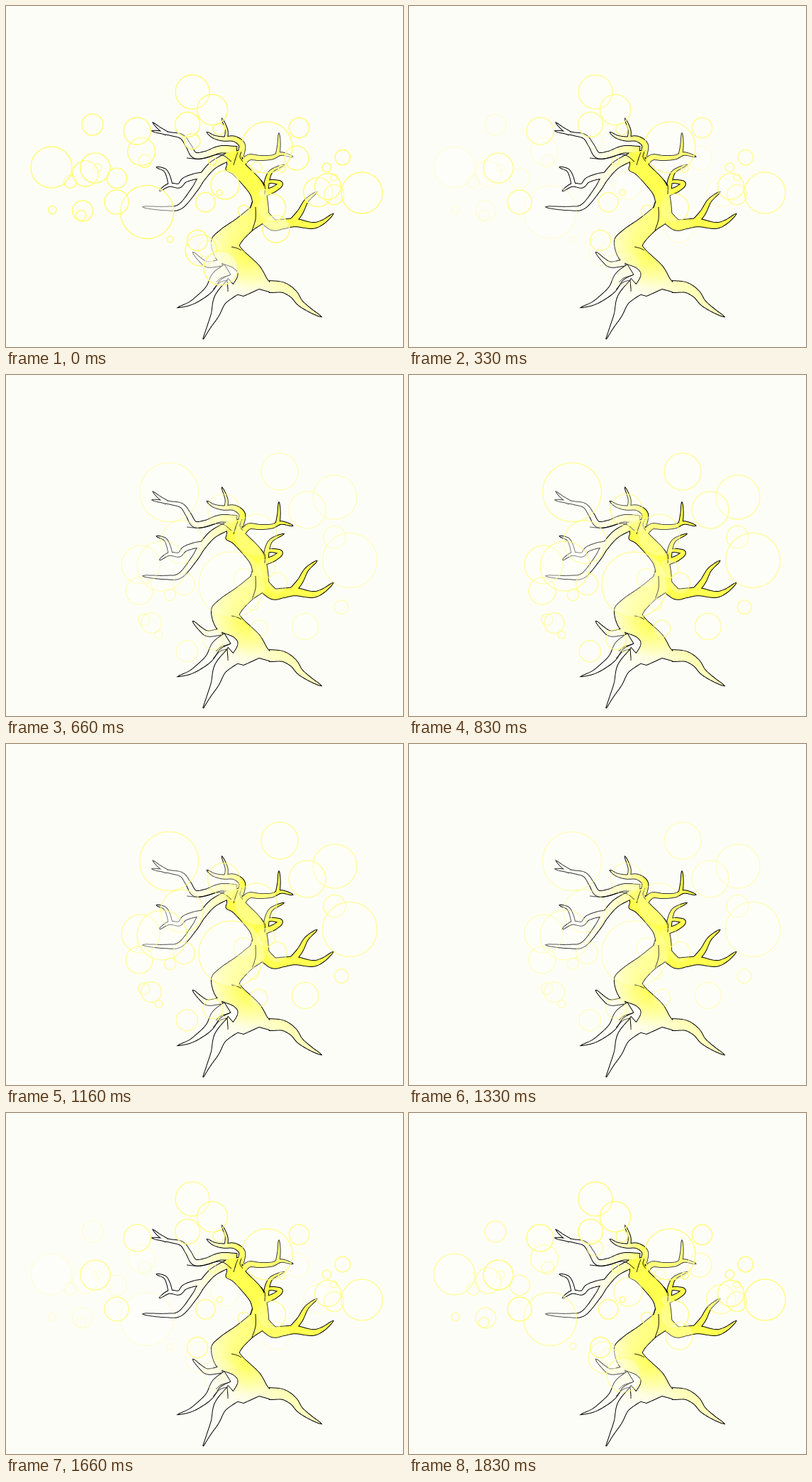
An HTML page with a canvas for the animation above (2000 ms loop, 560 by 480 pixels).

```html
<!DOCTYPE html>
<html lang="en">
<head>
<meta charset="utf-8">
<title>Tree and bubbles</title>
<style>
html, body { margin: 0; width: 100%; height: 100%; overflow: hidden; background: #fdfdf8; }
canvas { display: block; }
</style>
</head>
<body>
<canvas id="stage" width="560" height="480"></canvas>
<script>
const ctx = document.getElementById('stage').getContext('2d');
const LOOP = 2000, STEPS = 12;
const PAPER = '#fdfdf8', PALE = '#fefee0', SOFT = '#ffffb0', WARM = '#ffff80', BRIGHT = '#ffff50';

const points = text => text.trim().split(/\s+/).map(s => s.split(',').map(Number));

// Samples a smooth curve through the given points.
function sample(p, n = 10) {
  const out = [];
  for (let i = 0; i < p.length - 1; i++) {
    const a = p[i - 1] || p[i], b = p[i], c = p[i + 1], d = p[i + 2] || c;
    for (let k = 0; k < n; k++) {
      const t = k / n;
      out.push([0, 1].map(j => b[j] + 0.5 * t * (c[j] - a[j] +
        t * (2 * a[j] - 5 * b[j] + 4 * c[j] - d[j] + t * (3 * (b[j] - c[j]) + d[j] - a[j])))));
    }
  }
  return [...out, p[p.length - 1]];
}

function polyline(list) {
  const path = new Path2D();
  list.forEach(q => path.lineTo(...q));
  return path;
}

// "|" marks a sharp corner between two smooth runs.
const curve = text => polyline(text.split('|').flatMap(run => sample(points(run))));

// A limb follows its centre line and narrows from its base width to a point.
function limb(width, taper, text) {
  const mid = sample(points(text)), last = mid.length - 1;
  const side = sign => mid.map(([x, y], i) => {
    const a = mid[Math.max(i - 1, 0)], b = mid[Math.min(i + 1, last)];
    const dx = b[0] - a[0], dy = b[1] - a[1];
    const k = sign * width / 2 * (1 - i / last) ** taper / Math.hypot(dx, dy);
    return [x - dy * k, y + dx * k];
  });
  const path = polyline([...side(1), ...side(-1).reverse()]);
  path.closePath();
  return path;
}

function linear(x0, y0, x1, y1, ...colors) {
  const g = ctx.createLinearGradient(x0, y0, x1, y1);
  colors.forEach((c, i) => g.addColorStop(i / (colors.length - 1), c));
  return g;
}

const trunk = curve('310,207 312,222 311,231 322,238 343,262 348,275 | 345,284 325,300 302,316 290,331 298,357 322,369 327,381 313,402 | 335,408 357,398 | 375,403 390,402 | 390,390 372,389 357,366 332,342 331,333 347,316 366,302 370,287 362,250 335,220 333,203 | 310,207 310,207');

const roots = [
  limb(26, 1.3, '322,394 303,412 295,434 286,452 278,469'),
  limb(16, 0.8, '372,395 390,396 405,405 415,418 430,429 444,437'),
  limb(16, 0.9, '312,371 297,381 287,398 272,411 259,419 244,424'),
  limb(9, 0.6, '304,361 285,364 275,358 264,347')
];

const canopy = [
  limb(10, 0.5, '325,203 302,202 282,209 266,210 257,196 248,184 232,180 207,176'),
  limb(5, 0.8, '226,179 216,172 208,165'),
  limb(9, 0.6, '330,212 333,196 322,187 306,187 293,184 284,178'),
  limb(4, 0.5, '310,187 311,175 305,159'),
  limb(8, 0.5, '333,222 343,213 358,214 375,213 388,208 404,212'),
  limb(5, 0.6, '383,210 385,195 385,180'),
  limb(7, 0.6, '366,260 369,243 375,232 391,224'),
  limb(8, 0.5, '362,264 378,258 387,250 374,247 366,250'),
  limb(17, 0.7, '364,297 377,308 390,307 408,305 432,309 447,304 461,293'),
  limb(9, 0.6, '404,304 415,290 424,274 438,262'),
  limb(11, 0.5, '314,212 292,224 276,242 266,258 246,282 225,285 194,283'),
  limb(8, 0.5, '280,238 266,240 252,245 244,253 230,252 217,260'),
  limb(5, 0.5, '232,252 229,240 224,231 213,227')
];

const creases = [
  '345,284 348,275', '318,339 326,341 332,344', '352,283 352,300 347,316',
  '365,265 365,253 360,245', '333,203 330,212 334,219', '327,206 324,214 321,224',
  '255,214 275,215 302,209 318,219', '315,379 303,383 296,389', '292,399 302,389 312,386 | 313,398 313,402'
].map(curve);

const trunkFill = linear(270, 390, 360, 270, PAPER, PALE, SOFT, WARM, BRIGHT);
const canopyFill = linear(225, 0, 335, 0, PAPER, PAPER, PALE, SOFT, BRIGHT);
const glow = ctx.createRadialGradient(338, 350, 0, 338, 350, 48);
glow.addColorStop(0, 'rgba(255,255,80,.9)');
glow.addColorStop(1, 'rgba(255,255,80,0)');

function drawTree() {
  ctx.strokeStyle = '#000';
  // The fills cover the inner half of each line, which joins the limbs cleanly.
  ctx.lineWidth = 2;
  for (const p of [trunk, ...roots, ...canopy]) ctx.stroke(p);
  ctx.fillStyle = canopyFill;
  for (const p of canopy) ctx.fill(p);
  ctx.fillStyle = trunkFill;
  for (const p of [...roots, trunk]) ctx.fill(p);
  ctx.fillStyle = glow;
  ctx.fill(trunk);
  ctx.lineWidth = 1;
  for (const p of creases) ctx.stroke(p);
}

function seeded(seed) {
  return () => (seed = seed * 16807 % 2147483647) / 2147483647;
}

// Small bubbles scatter over an ellipse; the large ones have set places.
function bubbles(seed, count, cx, cy, rx, ry, large) {
  const rnd = seeded(seed);
  const small = Array.from({ length: count }, () => {
    const a = rnd() * Math.PI * 2, d = Math.sqrt(rnd());
    return [cx + rx * d * Math.cos(a), cy + ry * d * Math.sin(a), 4 + 12 * rnd()];
  });
  return [...small, ...points(large)];
}

// Opacity falls or rises in even steps between two steps of the half loop.
const ramp = (step, from, to) => Math.min(1, Math.max(0, (step - from) / (to - from)));

const groups = [
  {
    veil: 0.5, alpha: s => s < 4 ? Math.max(0.22, 1 - 0.38 * s) : 0,
    rings: bubbles(4177, 12, 240, 250, 190, 100,
      '64,227,29 112,236,18 122,167,15 191,205,19.5 199,290,37.5 309,252,20 275,344,22 303,369,24 381,314,19 440,262,20.5 410,214,17')
  },
  {
    veil: 0.28, alpha: s => s < 4 ? 1 - 0.055 * s * s : 0,
    rings: bubbles(9203, 11, 350, 235, 170, 95,
      '263,121,24 291,146,21.5 256,167,17.5 185,176,19 126,228,21 156,276,17 270,330,14.5 368,199,36 375,284,19.5 502,263,29 454,254,18.5')
  },
  {
    veil: 0.45, alpha: s => 0.9 * ramp(s, 2.2, 6),
    rings: bubbles(6151, 16, 310, 260, 200, 140,
      '248,235,30 230,165,41.5 190,267,27 188,304,19 220,269,35 307,190,22.5 318,295,46 353,225,29 386,136,26 464,172,31 425,190,26 485,261,38.5 422,354,18.5')
  }
];

function drawRings({ rings, veil, alpha }, step) {
  const a = alpha(step);
  if (!a) return;
  ctx.fillStyle = PAPER;
  ctx.strokeStyle = '#ffff78';
  ctx.lineWidth = 1.5;
  for (const [x, y, r] of rings) {
    ctx.beginPath();
    ctx.arc(x, y, r, 0, Math.PI * 2);
    ctx.globalAlpha = a * veil;
    ctx.fill();
    ctx.globalAlpha = a;
    ctx.stroke();
  }
  ctx.globalAlpha = 1;
}

// Steps fall on whole hundredths of a second.
const starts = Array.from({ length: STEPS }, (_, i) => Math.floor(i * LOOP / STEPS / 10) * 10);

function draw(now) {
  const t = now % LOOP;
  const tick = starts.filter(s => s <= t).length - 1;
  const step = Math.min(tick, STEPS - tick);
  ctx.fillStyle = PAPER;
  ctx.fillRect(0, 0, 560, 480);
  drawTree();
  for (const g of groups) drawRings(g, step);
}

const begin = performance.now();
function loop() {
  draw(performance.now() - begin);
  requestAnimationFrame(loop);
}
loop();
</script>
</body>
</html>
```
